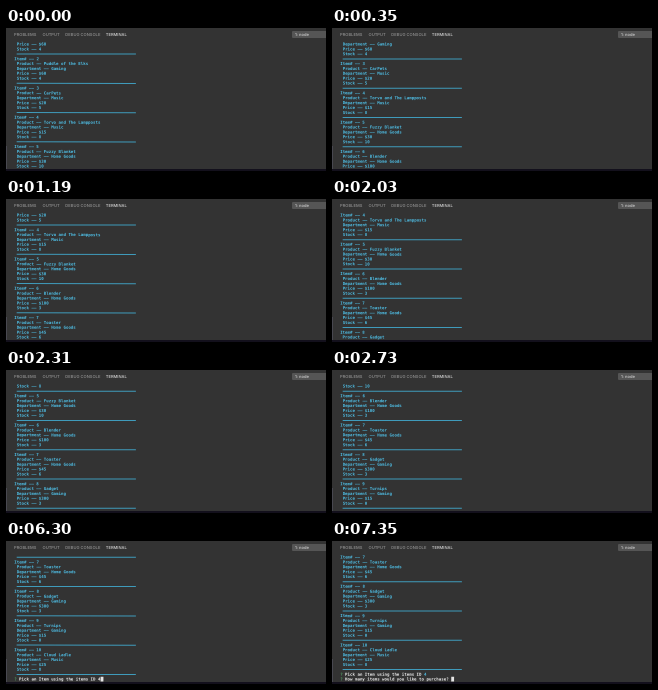
Animation, 320 px wide and 143 px high, one loop 8 s. Source, as an HTML page:

```html
<!DOCTYPE html>
<html lang="en">
<head>
<meta charset="utf-8">
<title>Store terminal</title>
<style>
  html, body { margin: 0; width: 100%; height: 100%; overflow: hidden; background: #333; }
  svg { display: block; width: 100%; height: 100%; }
  text { white-space: pre; text-rendering: geometricPrecision; }
  .tab { font: 500 4.1px Inter, sans-serif; fill: #939393; }
  .tab.on { fill: #d6d6d6; }
  .mono { font: bold 4.1px "DejaVu Sans Mono", monospace; fill: #4fbfe6; }
  .mono.ask { fill: #f0f0f0; }
  .mono.mark { fill: #55a868; }
</style>
</head>
<body>
<svg viewBox="0 0 320 143" preserveAspectRatio="none">
  <clipPath id="screen"><rect x="0" y="13.6" width="320" height="127.4"/></clipPath>
  <rect width="320" height="143" fill="#333"/>
  <text class="tab" x="8" y="7.8">PROBLEMS</text>
  <text class="tab" x="36.5" y="7.8">OUTPUT</text>
  <text class="tab" x="59.3" y="7.8">DEBUG CONSOLE</text>
  <text class="tab on" x="99.8" y="7.8">TERMINAL</text>
  <rect x="286" y="3" width="36" height="7" rx="1" fill="#555"/>
  <text class="tab on" x="289" y="7.8">1: node</text>
  <rect x="0" y="118" width="1" height="23" fill="#484850"/>
  <rect x="0" y="141" width="320" height="2" fill="#13101c"/>
  <g clip-path="url(#screen)"><g id="log"></g></g>
</svg>
<script>
const LOOP = 8000, LEFT = 8.2, CHAR = 2.468, ROW = 4.88, FIRST = 16;
const log = document.getElementById('log');

// name, department, price, stock
const items = [
  ['Lamp', 'Home Goods', 60, 4],
  ['Puddle of the Elks', 'Gaming', 60, 4],
  ['CarPets', 'Music', 20, 5],
  ['Torvo and The Lampposts', 'Music', 15, 8],
  ['Fuzzy Blanket', 'Home Goods', 30, 10],
  ['Blender', 'Home Goods', 100, 3],
  ['Toaster', 'Home Goods', 45, 6],
  ['Gadget', 'Gaming', 300, 3],
  ['Turnips', 'Gaming', 15, 0],
  ['Cloud Ladle', 'Music', 25, 8],
];

// start time and the line at the top of the screen
const scroll = [
  [0, 9], [70, 10], [140, 11], [210, 12], [350, 14], [420, 15], [560, 16], [700, 17],
  [910, 18], [980, 19], [1050, 20], [1190, 21],
  ...Array.from({ length: 8 }, (_, i) => [1890 + 70 * i, 22 + i]),
  [2520, 30], [2590, 32], [2660, 33], [2730, 34],
  [2870, 36], [2940, 37], [3010, 39], [3080, 40], [3150, 41], [7280, 42],
];
const TYPED = 6300, ENTERED = 7280, ASKED = 7350;

function add(tag, attrs, content = '') {
  const el = document.createElementNS('http://www.w3.org/2000/svg', tag);
  for (const key in attrs) el.setAttribute(key, attrs[key]);
  el.textContent = content;
  return log.appendChild(el);
}
const colX = col => LEFT + col * CHAR;
const rowY = line => FIRST + line * ROW;
const write = (line, col, content, kind = '') =>
  add('text', { class: 'mono ' + kind, x: colX(col), y: rowY(line) + 1.6 }, content);

items.forEach(([name, department, price, stock], i) => {
  const line = 6 * (i + 1);
  write(line, 0, `Item# —— ${i + 1}`);
  [`Product —— ${name}`, `Department —— ${department}`, `Price —— $${price}`, `Stock —— ${stock}`]
    .forEach((row, k) => write(line + 1 + k, 1, row));
  add('rect', { x: colX(1), y: rowY(line + 5) - .2, width: 48.3 * CHAR, height: 1, fill: '#3f9bbb' });
});

const PROMPT = 6 * items.length + 6;
write(PROMPT, 0, '?', 'mark');
write(PROMPT, 2, 'Pick an Item using the items ID', 'ask');
const answer = write(PROMPT, 34, '4');
const question = [
  write(PROMPT + 1, 0, '?', 'mark'),
  write(PROMPT + 1, 2, 'How many items would you like to purchase?', 'ask'),
];
const cursor = add('rect', { width: CHAR + .4, height: 4.7, fill: '#e4e4e4' });

const show = (el, on) => el.setAttribute('visibility', on ? 'visible' : 'hidden');

function draw(t) {
  const top = scroll.findLast(([start]) => start <= t)[1];
  // the tiny rotation keeps baselines from snapping to whole pixels
  log.setAttribute('transform', `translate(0 ${-top * ROW}) rotate(.03 60 ${rowY(top + 13)})`);
  show(answer, t >= TYPED);
  answer.setAttribute('class', t < ENTERED ? 'mono ask' : 'mono');
  question.forEach(el => show(el, t >= ASKED));
  const col = t >= ASKED ? 45 : t >= ENTERED ? 0 : t >= TYPED ? 35 : 34;
  cursor.setAttribute('x', colX(col));
  cursor.setAttribute('y', rowY(PROMPT + (t >= ENTERED ? 1 : 0)) - 2.3);
}

const begin = performance.now();
function tick() {
  draw((performance.now() - begin) % LOOP);
  requestAnimationFrame(tick);
}
tick();
</script>
</body>
</html>
```
